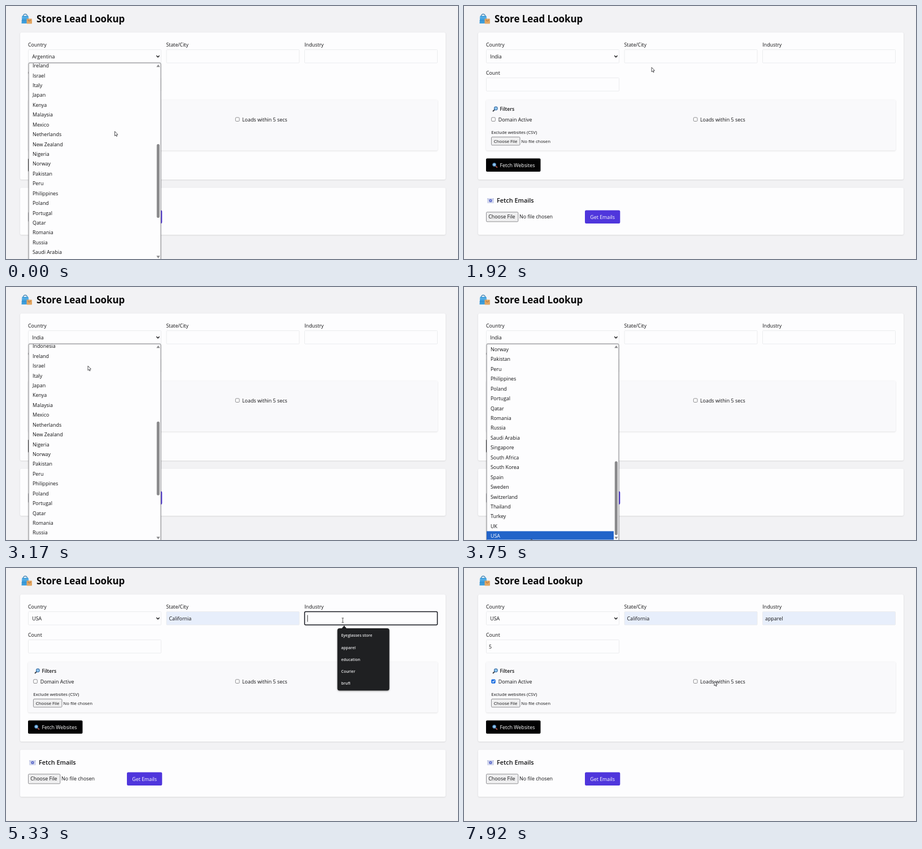
Animation, 800 px wide and 449 px high, one loop 8 s. Source, as an HTML page with a canvas:

```html
<!DOCTYPE html>
<html lang="en">
<head>
<meta charset="utf-8">
<title>Data finder form</title>
<style>
html, body { margin: 0; width: 100%; height: 100%; overflow: hidden; background: #f2f2f4; }
canvas { display: block; width: 800px; height: 449px; }
</style>
</head>
<body>
<canvas id="stage" width="800" height="449"></canvas>
<script>
const ctx = document.getElementById('stage').getContext('2d');
const LOOP = 8000, STEP = 1000 / 12;
const SANS = '"Open Sans", "Noto Sans", sans-serif';
const INK = '#111113', WHITE = '#fdfdfe', AUTOFILL = '#e7eefb', EDGE = '#e9eaed';
const ROW = 17.43, LIST_TOP = 101;

const countries = ('Argentina,Australia,Austria,Bangladesh,Belgium,Brazil,Canada,Chile,China,Colombia,' +
  'Czech Republic,Denmark,Egypt,Finland,France,Germany,Greece,Hungary,India,Indonesia,Ireland,Israel,' +
  'Italy,Japan,Kenya,Malaysia,Mexico,Netherlands,New Zealand,Nigeria,Norway,Pakistan,Peru,Philippines,' +
  'Poland,Portugal,Qatar,Romania,Russia,Saudi Arabia,Singapore,South Africa,South Korea,Spain,Sweden,' +
  'Switzerland,Thailand,Turkey,UK,USA').split(',');
const states = ['Texas', 'karnataka', 'California', 'Taiwan'];
const industries = ['Eyeglasses store', 'apparel', 'education', 'Courier', 'brufi'];

// step, x, y
const cursorPath = [
  [0, 192.5, 222.5], [7, 192.5, 222.5], [14, 164, 221.5], [18, 160, 254], [19, 160, 254],
  [24, 352, 92], [26, 352, 92], [30, 363.5, 179], [32, 363.5, 179], [35, 150, 92], [36, 150, 100],
  [40, 140, 180], [45, 119, 447], [47, 119, 447], [52, 350, 92], [53, 350, 92], [56, 363, 158],
  [58, 363, 158], [62, 596, 92.5], [64, 596, 92.5], [67, 606, 138], [69, 606, 138],
  [75, 209.5, 150], [76, 207, 142], [83, 207, 142], [88, 52, 200], [90, 52, 200],
  [94, 445, 201], [95, 443, 201]
];
// step, offset
const firstScroll = [[0, 352.6], [1, 352.6], [12, 168.3]];
const secondScroll = [[35, 150], [36, 150], [40, 522]];

function follow(path, n) {
  let i = 0;
  while (i < path.length - 2 && path[i + 1][0] <= n) i++;
  const a = path[i], b = path[i + 1];
  const u = Math.min(1, Math.max(0, (n - a[0]) / (b[0] - a[0])));
  const k = u * u * (3 - 2 * u);
  return a.slice(1).map((v, j) => v + (b[j + 1] - v) * k);
}

const within = (n, a, b) => n >= a && n < b;

function text(str, x, y, size = 8.9, color = INK, weight = 400, family = SANS) {
  ctx.font = `${weight} ${size}px ${family}`;
  ctx.fillStyle = color;
  ctx.fillText(str, x, y + size * 0.355);
}

function box(x, y, w, h, r, fill, stroke, line = 1) {
  ctx.beginPath();
  ctx.roundRect(x, y, w, h, r);
  if (fill) { ctx.fillStyle = fill; ctx.fill(); }
  if (stroke) { ctx.strokeStyle = stroke; ctx.lineWidth = line; ctx.stroke(); }
}

function shape(points, fill, stroke, line = 1, closed = true) {
  ctx.beginPath();
  points.forEach(([x, y], i) => i ? ctx.lineTo(x, y) : ctx.moveTo(x, y));
  if (closed) ctx.closePath();
  if (fill) { ctx.fillStyle = fill; ctx.fill(); }
  if (stroke) { ctx.strokeStyle = stroke; ctx.lineWidth = line; ctx.stroke(); }
}

function dot(x, y, r, fill, stroke, line) {
  box(x - r, y - r, 2 * r, 2 * r, r, fill, stroke, line);
}

function panel(x, y, w, h, fill) {
  ctx.save();
  ctx.shadowColor = 'rgba(0,0,0,.13)';
  ctx.shadowBlur = 2.5;
  ctx.shadowOffsetY = 0.8;
  box(x, y, w, h, 2.5, fill);
  ctx.restore();
}

function bags() {
  ctx.lineCap = 'round';
  ctx.beginPath();
  ctx.arc(34, 18, 3.6, Math.PI, 0);
  ctx.strokeStyle = '#2d78ad';
  ctx.lineWidth = 1.3;
  ctx.stroke();
  shape([[28.5, 17.5], [39.5, 17.5], [41, 31], [27.5, 31]], '#3f9fdd');
  shape([[28, 21], [40, 21]], null, '#7cc4ee', 1.2, false);
  shape([[28, 26], [40, 26]], null, '#2f86c4', 1, false);
  box(36.5, 22.5, 9.5, 9, 1, '#e3a763');
  ctx.beginPath();
  ctx.arc(41.2, 24.5, 2.2, 0, Math.PI);
  ctx.strokeStyle = '#a5652f';
  ctx.lineWidth = 0.9;
  ctx.stroke();
  ctx.lineCap = 'butt';
}

function lens(x, y, dir) {
  shape([[x - dir * 0.5, y + 0.8], [x - dir * 4, y + 4]], null, dir > 0 ? '#3b4148' : '#a4534a', 1.9, false);
  dot(x + dir * 1.4, y - 1.2, 2.9, '#8fc6ee', '#4173a8', 1.1);
}

function mailIcon() {
  box(41, 341, 12, 9, 1, '#d5d9ee');
  shape([[41, 341.5], [47, 346], [53, 341.5]], null, '#aab1d8', 0.8, false);
  dot(47, 345.4, 2.6, '#5a68c8');
  dot(47, 345.4, 1, '#c9d0f4');
}

function checkbox(x, y, on) {
  box(x + 0.4, y + 0.4, 6.6, 6.6, 1.3, on ? '#1b6fe0' : '#fff', on ? '#1b6fe0' : '#717175', 0.8);
  if (on) shape([[x + 1.8, y + 3.8], [x + 3.2, y + 5.2], [x + 5.8, y + 2.2]], null, '#fff', 1.1, false);
}

function fileInput(x, y, w, h, size, pad) {
  box(x + 0.5, y + 0.5, w, h, 1.5, '#efeff0', '#77777b', 0.8);
  text('Choose File', x + pad, y + h / 2 + 0.5, size);
  text('No file chosen', x + w + 2.8, y + h / 2 + 0.5, size);
}

function field(x, y, { value = '', focus, filled, preview, caret } = {}) {
  box(x + 0.5, y + 0.5, 235, 23.5, focus ? 2 : 1, filled ? AUTOFILL : WHITE, focus ? '#15171e' : EDGE, focus ? 1.5 : 0.9);
  if (preview) text(value, x + 5.5, y + 13, 7.8, INK, 400, '"Liberation Sans", Arial, sans-serif');
  else text(value, x + 5, y + 12.8);
  if (caret) {
    ctx.fillStyle = '#222';
    ctx.fillRect(x + 5.3, y + 6.5, 0.9, 12);
  }
}

function popup(fieldX, items, cursor) {
  const x = fieldX + 58.5, y = 107, h = 21.2 * items.length + 4.4;
  ctx.save();
  ctx.shadowColor = 'rgba(0,0,0,.35)';
  ctx.shadowBlur = 3;
  ctx.shadowOffsetY = 1;
  box(x, y, 92, h, 4, '#1f2022');
  ctx.restore();
  shape([[x + 7.5, y + 0.5], [x + 12, y - 5], [x + 16.5, y + 0.5]], '#1f2022');
  const hover = hoveredItem(items, cursor);
  items.forEach((item, i) => {
    const cy = 120 + 21.2 * i;
    if (i === hover) {
      box(x + 2.5, cy - 10.4, 87, 20.8, 3, '#343538');
      shape([[x + 77, cy - 2.3], [x + 81.6, cy + 2.3]], null, '#dcdce0', 0.9, false);
      shape([[x + 77, cy + 2.3], [x + 81.6, cy - 2.3]], null, '#dcdce0', 0.9, false);
    }
    text(item, x + 6.7, cy, 7, '#e6e6e8', 600);
  });
}

function hoveredItem(items, [, y]) {
  const i = Math.floor((y - 109.4) / 21.2);
  return i >= 0 && i < items.length ? i : -1;
}

function countryList(scroll, active) {
  ctx.save();
  ctx.shadowColor = 'rgba(0,0,0,.25)';
  ctx.shadowBlur = 2;
  box(40, LIST_TOP, 234, 360, 2, WHITE, '#85858a', 0.8);
  ctx.restore();
  ctx.save();
  ctx.beginPath();
  ctx.rect(40, LIST_TOP + 0.6, 233, 347);
  ctx.clip();
  countries.forEach((name, i) => {
    const y = 110 + ROW * i - scroll;
    if (y < 85 || y > 465) return;
    if (i === active) {
      ctx.fillStyle = '#2264c9';
      ctx.fillRect(40, y - 8.7, 225, ROW);
    }
    text(name, 47, y, 8.9, i === active ? '#fff' : INK);
  });
  ctx.restore();
  box(266.8, 111 + scroll * 0.38, 5, 131, 2.5, '#8a8a8c');
  shape([[266.3, 108.2], [269.4, 103.8], [272.5, 108.2]], '#8a8a8c');
  shape([[266.3, 443.3], [269.4, 447.7], [272.5, 443.3]], '#8a8a8c');
}

function pointer(x, y) {
  const pts = [[0, 0], [0, 8], [1.8, 6.4], [3, 9], [4.2, 8.4], [3.1, 5.9], [5.4, 5.7]];
  shape(pts.map(([a, b]) => [x + a, y + b]), '#fff', '#28282c', 0.8);
}

function iBeam(x, y) {
  ctx.fillStyle = '#333';
  ctx.fillRect(x - 0.4, y - 3.5, 0.8, 7.5);
  ctx.fillRect(x - 1.8, y - 4, 3.6, 0.8);
  ctx.fillRect(x - 1.8, y + 3.5, 3.6, 0.8);
}

function draw(n) {
  const cursor = follow(cursorPath, n), [cx, cy] = cursor;
  const listOpen = n < 19 || within(n, 35, 47);
  const stateOpen = within(n, 25, 33) || within(n, 53, 58);
  const industryOpen = within(n, 63, 69);
  const blink = since => (n - since) % 12 < 6;

  ctx.fillStyle = '#f2f2f4';
  ctx.fillRect(0, 0, 800, 449);
  bags();
  text('Store Lead Lookup', 54, 23, 16.9, '#050506', 700);

  panel(25, 47, 753, 261, WHITE);
  panel(25, 322.5, 753, 83.5, WHITE);
  text('Country', 39, 68.5, 8.8);
  text('State/City', 283.5, 68.5, 8.8);
  text('Industry', 528.3, 68.5, 8.8);
  text('Count', 39, 118.7, 8.8);

  field(39, 77);
  text(n < 19 ? 'Argentina' : n < 47 ? 'India' : 'USA', 46.2, 90);
  shape([[266.3, 88], [268.9, 90.7], [271.5, 88]], null, '#17171a', 1.4, false);

  const statePick = stateOpen ? hoveredItem(states, cursor) : -1;
  const stateSet = n >= 58;
  field(283.5, 77, {
    value: stateSet ? 'California' : states[statePick],
    focus: within(n, 25, 35) || within(n, 52, 62),
    filled: stateSet || statePick >= 0,
    preview: !stateSet,
    caret: stateOpen && statePick < 0 && blink(n < 40 ? 25 : 52)
  });

  const industryPick = industryOpen ? hoveredItem(industries, cursor) : -1;
  const industrySet = n >= 69;
  field(528, 77, {
    value: industrySet ? 'apparel' : industries[industryPick],
    focus: within(n, 62, 76),
    filled: industrySet || industryPick >= 0,
    preview: !industrySet,
    caret: within(n, 62, 69) && industryPick < 0 && blink(62)
  });

  field(39, 127, {
    value: n >= 79 ? '5' : '',
    focus: within(n, 76, 89),
    caret: within(n, 76, 79)
  });

  panel(39, 166.5, 725, 90, '#f9f9fb');
  lens(55, 183, 1);
  text('Filters', 63.5, 183.3, 8.6, INK, 600);
  checkbox(48.3, 197.5, n >= 89);
  text('Domain Active', 60.7, 202);
  checkbox(405.9, 197.5, false);
  text('Loads within 5 secs', 418, 202);
  text('Exclude websites (CSV)', 48.2, 224.5, 7.7);
  fileInput(48, 232, 50.5, 14.5, 7.8, 4.8);

  box(39, 270.5, 96.5, 23.5, 2, '#020203');
  lens(55, 282.8, -1);
  text('Fetch Websites', 63.5, 283, 8.9, '#fff');

  mailIcon();
  text('Fetch Emails', 58, 345.5, 10.9, INK, 600);
  fileInput(39, 365.3, 56.3, 17, 8.9, 4.2);
  box(214, 362.5, 62.3, 23.5, 2.3, '#4f36dc');
  text('Get Emails', 223.3, 374.5, 8.9, '#fff');

  if (listOpen) {
    const [scroll] = follow(n < 19 ? firstScroll : secondScroll, n);
    const hover = Math.floor((cy - LIST_TOP - 0.3 + scroll) / ROW);
    countryList(scroll, n < 13 ? -1 : within(n, 35, 40) ? 18 : hover);
  }
  if (stateOpen) popup(283.5, states, cursor);
  if (industryOpen) popup(528, industries, cursor);

  const overField = (cx > 283 && cy > 77 && cy < 101) || (cx > 39 && cx < 274 && cy > 128 && cy < 148);
  if (overField && !listOpen) iBeam(cx, cy);
  else pointer(cx, cy);
}

function tick(now) {
  draw(Math.min(95, Math.floor((now % LOOP + 5) / STEP)));
  requestAnimationFrame(tick);
}

let start;
requestAnimationFrame(function begin(now) {
  start = now;
  const run = t => { tickAt(t - start); requestAnimationFrame(run); };
  run(now);
});

function tickAt(elapsed) {
  draw(Math.min(95, Math.floor((elapsed % LOOP + 5) / STEP)));
}
</script>
</body>
</html>
```
